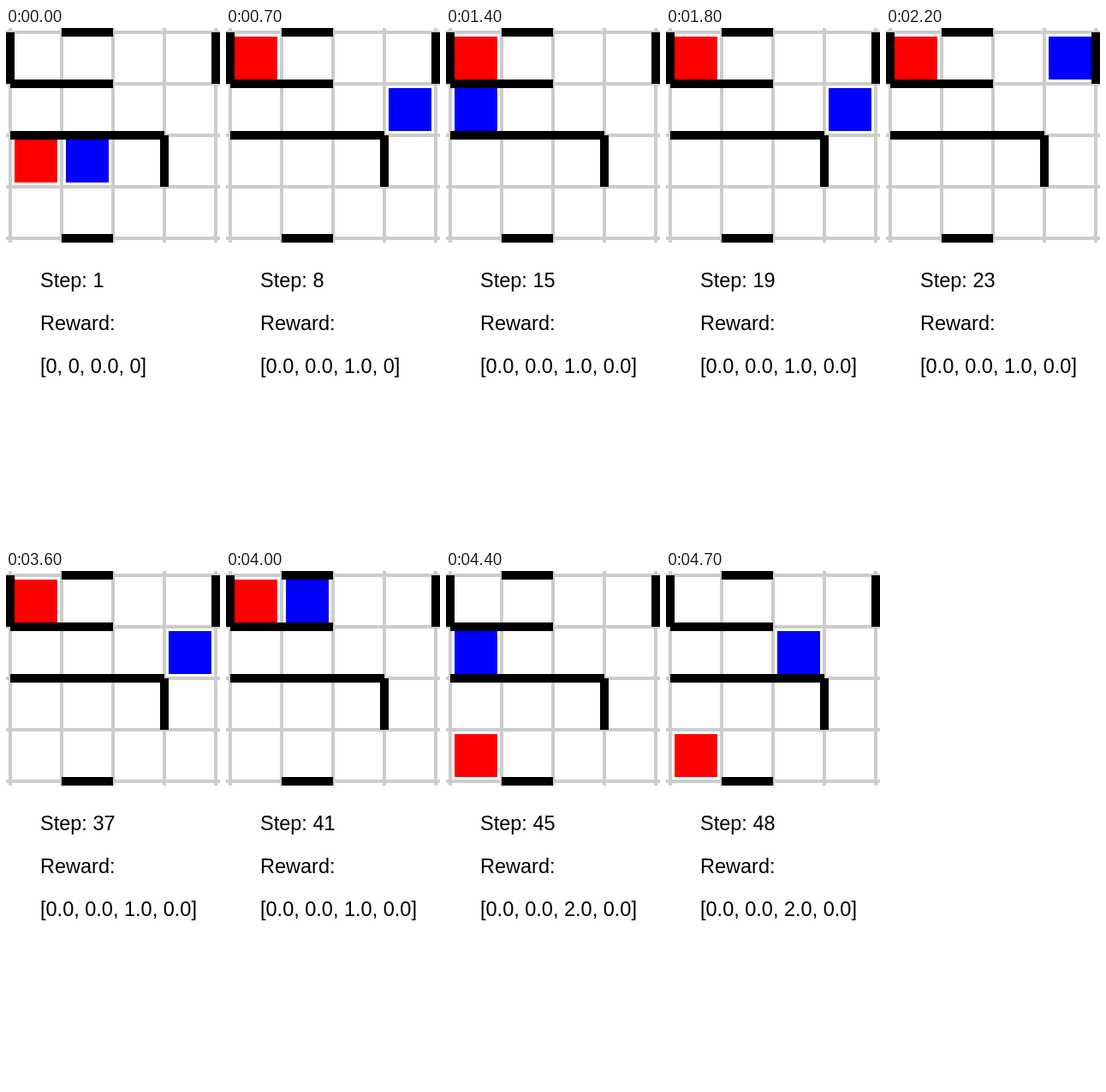
These frames come from a looping animation (250x600 px, 4800 ms). An HTML page with a canvas:

```html
<!DOCTYPE html>
<html lang="en">
<head>
<meta charset="utf-8">
<title>Grid walk</title>
<style>
html, body { margin: 0; width: 250px; height: 600px; overflow: hidden; background: #fff; }
canvas { display: block; }
</style>
</head>
<body>
<canvas id="stage" width="250" height="600"></canvas>
<script>
const ctx = document.getElementById('stage').getContext('2d');
const STEP_MS = 100, STEPS = 48;
const CELL = 60, EDGE = 5, SIZE = 4;

// Walls as column, row, length in cells, vertical flag
const WALLS = [
  [1, 0, 1, 0], [1, 4, 1, 0], [0, 1, 2, 0], [0, 2, 3, 0],
  [0, 0, 1, 1], [4, 0, 1, 1], [3, 2, 1, 1]
];

// Each round: first step, walker start, goal, then one move per step ('-' is a bump)
const ROUNDS = [
  { from: 1, at: [1, 2], goal: [0, 2], moves: '' },
  { from: 2, at: [2, 0], goal: [0, 0],
    moves: 'D-L-LL' + 'RR-L-LR' + 'RL-LRLU' + '-DLRL-L' + '-RULRD-RULL' },
  { from: 42, at: [3, 2], goal: [0, 3], moves: '-URR-R' }
];
const MOVES = { U: [0, -1], D: [0, 1], L: [-1, 0], R: [1, 0], '-': [0, 0] };

const wrap = n => (n + SIZE) % SIZE;

function stateAt(step) {
  const round = ROUNDS.filter(r => r.from <= step).pop();
  let [x, y] = round.at;
  for (const m of round.moves.slice(0, step - round.from)) {
    x = wrap(x + MOVES[m][0]);
    y = wrap(y + MOVES[m][1]);
  }
  return { walker: [x, y], goal: round.goal };
}

// A total turns into a decimal once its action has been tried
function rewards(step) {
  const total = step < 2 ? '0.0' : step < 42 ? '1.0' : '2.0';
  const tried = first => step >= first ? '0.0' : '0';
  return `[${tried(6)}, ${tried(3)}, ${total}, ${tried(9)}]`;
}

function rect(color, x, y, w, h) {
  ctx.fillStyle = color;
  ctx.fillRect(x, y, w, h);
}

function square(color, [x, y]) {
  rect(color, x * CELL + 10, y * CELL + 10, 50, 50);
}

function draw(step) {
  rect('#fff', 0, 0, 250, 600);
  for (let i = 0; i <= SIZE; i++) {
    const p = EDGE + i * CELL - 2;
    rect('#ccc', p, 0, 4, 250);
    rect('#ccc', 0, p, 250, 4);
  }
  for (const [c, r, n, vertical] of WALLS) {
    const x = EDGE + c * CELL, y = EDGE + r * CELL;
    if (vertical) rect('#000', x - 5, y, 10, n * CELL);
    else rect('#000', x, y - 5, n * CELL, 10);
  }
  const { walker, goal } = stateAt(step);
  square('#f00', goal);
  square('#00f', walker);

  ctx.fillStyle = '#000';
  ctx.font = '23.5px "Liberation Sans", Arial, sans-serif';
  ctx.fillText('Step: ' + step, 40, 302);
  ctx.fillText('Reward:', 40, 352);
  ctx.fillText(rewards(step), 40, 402);
}

const start = performance.now();
function tick() {
  const t = Math.max(0, performance.now() - start);
  draw(Math.floor(t / STEP_MS) % STEPS + 1);
  requestAnimationFrame(tick);
}
tick();
</script>
</body>
</html>
```
